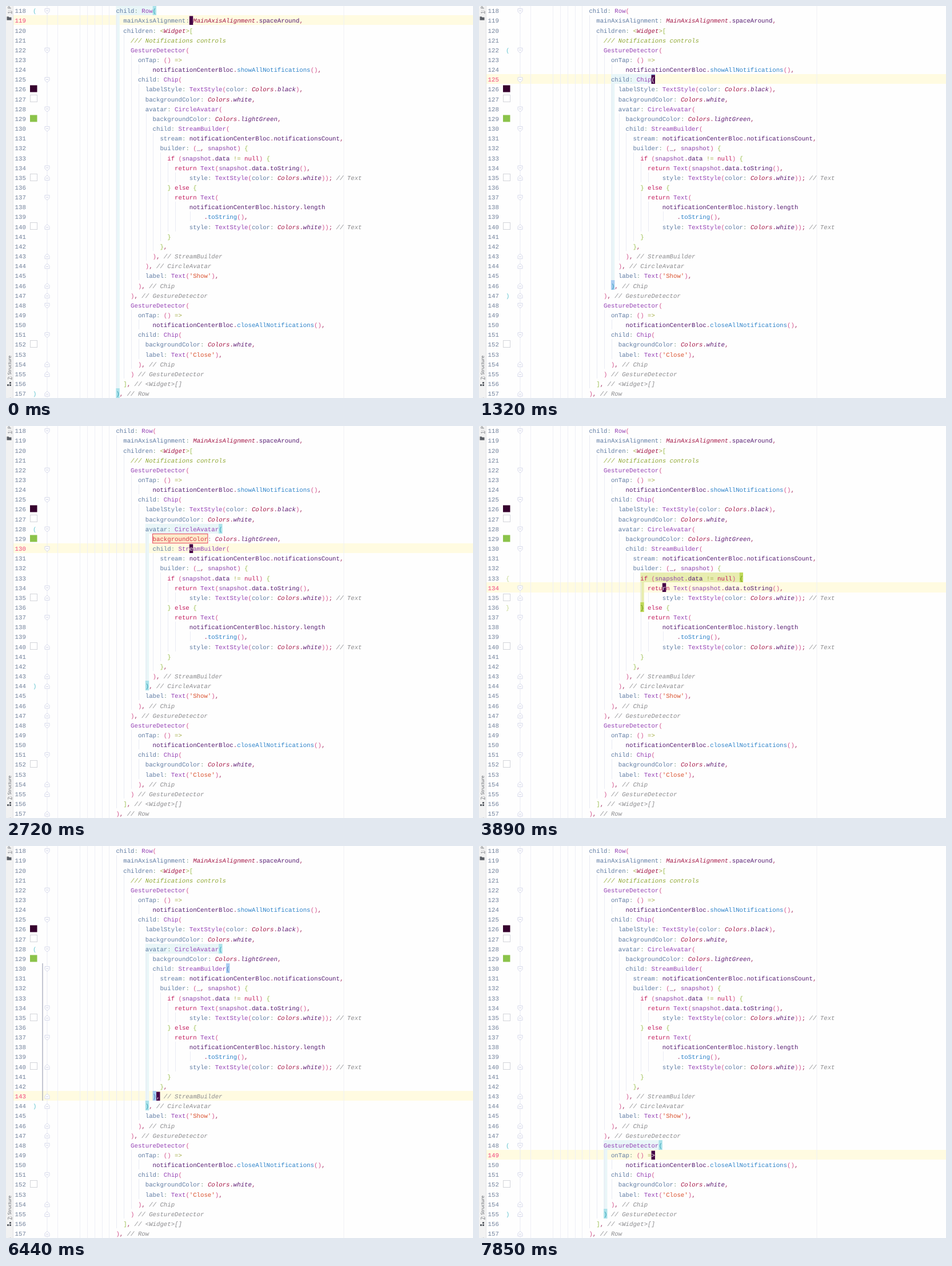
Animation of 817x685 px, one loop 8 s. Source, as an HTML page:

```html
<!DOCTYPE html>
<html lang="en">
<head>
<meta charset="utf-8">
<title>Code editor</title>
<style>
  html, body { margin: 0; width: 100%; height: 100%; overflow: hidden; background: #fefefe; }
  svg { display: block; width: 817px; height: 685px; }
  text { font: 10.7px "Liberation Mono", "DejaVu Sans Mono", monospace; white-space: pre; text-rendering: geometricPrecision; }
  .i { font-style: italic; }
  .side { font: 7.8px "Open Sans", "Noto Sans", sans-serif; fill: #55585f; }
</style>
</head>
<body>
<svg id="stage" viewBox="0 0 817 685" xmlns="http://www.w3.org/2000/svg">
  <rect width="817" height="685" fill="#fefefe"/>
  <g id="back"></g>
  <g id="fixed"></g>
  <g id="front"></g>
  <g id="side">
    <rect width="12.5" height="685" fill="#f2f2f2"/>
    <path d="M12.5 0V685" stroke="#e3e3e6"/>
    <text class="side" transform="translate(8.6 13.5) rotate(-90)"><tspan text-decoration="underline">1</tspan>: Project</text>
    <path d="M1.5 18.5h3l1 1.2h4v5h-8z" fill="#5b5f66"/>
    <text class="side" transform="translate(8.6 653) rotate(-90)"><tspan text-decoration="underline">7</tspan>: Structure</text>
    <path d="M6 657h3v3h-3zM2 661h3v3h-3zM6 661h3v3h-3z" fill="#5b5f66"/>
    <text class="side" transform="translate(8.6 688) rotate(-90)">s</text>
  </g>
</svg>
<script>
const FIRST = 118, ROW = 17.154, CW = 6.42, X0 = 192.4, LOOP = 8000;

const code = `child: Row(
  mainAxisAlignment: MainAxisAlignment.spaceAround,
  children: <Widget>[
    /// Notifications controls
    GestureDetector(
      onTap: () =>
          notificationCenterBloc.showAllNotifications(),
      child: Chip(
        labelStyle: TextStyle(color: Colors.black),
        backgroundColor: Colors.white,
        avatar: CircleAvatar(
          backgroundColor: Colors.lightGreen,
          child: StreamBuilder(
            stream: notificationCenterBloc.notificationsCount,
            builder: (_, snapshot) {
              if (snapshot.data != null) {
                return Text(snapshot.data.toString(),
                    style: TextStyle(color: Colors.white)); // Text
              } else {
                return Text(
                    notificationCenterBloc.history.length
                        .toString(),
                    style: TextStyle(color: Colors.white)); // Text
              }
            },
          ), // StreamBuilder
        ), // CircleAvatar
        label: Text('Show'),
      ), // Chip
    ), // GestureDetector
    GestureDetector(
      onTap: () =>
          notificationCenterBloc.closeAllNotifications(),
      child: Chip(
        backgroundColor: Colors.white,
        label: Text('Close'),
      ), // Chip
    ) // GestureDetector
  ], // <Widget>[]
), // Row`.split("\n");

// Token rules, first match wins: pattern, colour, italic
const rules = [
  [/\/\/\/.*/y, "#8fa832", 1],
  [/\/\/.*/y, "#8a8a8d", 1],
  [/'[^']*'/y, "#d9502c"],
  [/(return|if|else|null)\b/y, "#c2185b"],
  [/(Colors|MainAxisAlignment|Widget)\b/y, "#a31545", 1],
  [/(?<=Colors\.)\w+/y, "#5c1a72", 1],
  [/\w+(?=:)/y, "#5f7ba3"],
  [/[A-Z]\w*/y, "#9440b4"],
  [/(?<!data\.)\b\w+(?=\(\))/y, "#2c82c9"],
  [/snapshot\b/y, "#8a3ea8"],
  [/\w+/y, "#541a70"],
  [/[{}\[\]]/y, "#9dc04f"],
  [/=>|!=|[<>]/y, "#a3ad45"],
  [/:/y, "#7d9f86"],
  [/[()]/y, "#d4518c"],
  [/[.,;]/y, "#a3285c"],
  [/\s+/y, "none"]
];

const $ = id => document.getElementById(id);
const colX = c => X0 + c * CW;
const rowY = n => Math.round((n - FIRST) * ROW - 1);
const baseY = n => (n - FIRST) * ROW + 12.2;
const line = n => code[n - FIRST];
const bare = n => line(n).replace(/ *\/\/ .*/, "");
const indent = n => line(n).search(/\S/);
const esc = s => s.replace(/&/g, "&amp;").replace(/</g, "&lt;");
const rect = (x, y, w, h, fill, more = "") =>
  `<rect x="${x}" y="${y}" width="${w}" height="${h}" fill="${fill}" ${more}/>`;
// Fills the rows a to b between two columns
const block = (a, b, from, to, fill) =>
  b >= a && to > from ? rect(colX(from), rowY(a), (to - from) * CW, rowY(b + 1) - rowY(a), fill) : "";
const text = (x, n, s, fill, italic) =>
  `<text x="${x}" y="${baseY(n)}" fill="${fill}"${italic ? ' class="i"' : ""}>${esc(s)}</text>`;
const stroke = (d, color, w = 1) =>
  `<path d="${d}" fill="none" stroke="${color}" stroke-width="${w}"/>`;

function paintLine(n) {
  const s = line(n);
  let out = "", at = 0;
  while (at < s.length) {
    for (const [re, fill, italic] of rules) {
      re.lastIndex = at;
      const m = re.exec(s);
      if (!m) continue;
      if (fill !== "none") out += text(colX(at), n, m[0], fill, italic);
      at += m[0].length;
      break;
    }
  }
  return out;
}

const guide = (c, y1, y2, color) => stroke(`M${Math.ceil(colX(c) + .3) + .5} ${y1}V${y2}`, color);

function guides() {
  let out = "";
  for (const c of [-16, -10, -8, -6, -4, -2]) out += guide(c, 0, 685, "#eeeff6");
  code.forEach((s, k) => {
    const n = FIRST + k;
    let end = n + 1;
    while (line(end) && indent(end) > indent(n)) end++;
    if (end > n + 1) out += guide(indent(n), rowY(n + 1), rowY(end), "#e9ebf4");
  });
  return out + stroke("M591 0V685", "#eff0f5");
}

function fold(n, up) {
  const y = baseY(n) - 3.4, d = up ? -1 : 1;
  return `<path d="M68 ${y - 4 * d}h8v${5 * d}l-4 ${3.5 * d}l-4 ${-3.5 * d}z" fill="#fff" stroke="#d5d8ea"/>`
    + stroke(`M70 ${y - .5 * d}h4`, "#c9cde2");
}

const filled = (n, color) => rect(42, rowY(n) + 2.5, 12.5, 12, color);
const hollow = n => rect(42.5, rowY(n) + 2.5, 12, 12, "#fff", 'stroke="#d3d5da"');

function drawFixed() {
  let out = guides() + stroke("M72 0V685", "#e8eaf3");
  for (const n of [118, 122, 125, 128, 130, 134, 137, 148, 151]) out += fold(n);
  for (const n of [135, 140, 143, 144, 146, 147, 154, 155, 157]) out += fold(n, true);
  out += filled(126, "#36032e") + filled(129, "#8bc34a");
  for (const n of [127, 135, 140, 152]) out += hollow(n);
  code.forEach((_, k) => out += paintLine(FIRST + k));
  $("fixed").innerHTML = out;
}

// Start time and caret line
const steps = [
  [0, 119], [230, 120], [460, 121], [690, 122], [920, 123], [1150, 124],
  [1320, 125], [1390, 125], [1550, 126], [1780, 127], [2020, 128], [2340, 129],
  [2720, 130], [2950, 131], [3340, 132], [3570, 133], [3890, 134], [4270, 135],
  [4590, 136], [4900, 137], [5140, 138], [5440, 139], [5590, 140], [5910, 141],
  [6140, 142], [6440, 143], [6680, 144], [6910, 145], [7150, 146], [7390, 147],
  [7620, 148], [7850, 149]
];

// Scope name: first line, last line, bracket pair
const scopes = {
  row: [118, 157, "()"], list: [120, 156, "[]"], show: [122, 147, "()"], chip: [125, 146, "()"],
  avatar: [128, 144, "()"], stream: [130, 143, "()"], build: [132, 142, "{}"], test: [133, 133, "()"],
  yes: [133, 136, "{}"], yesText: [134, 135, "()"], no: [136, 141, "{}"], noText: [137, 140, "()"],
  label: [145, 145, "()"], close: [148, 155, "()"]
};

// Enclosing scope for caret lines 119 to 149
const scopeOf = ("row list list show show show chip chip chip chip avatar avatar stream stream test yes yesText " +
  "build no noText noText noText no stream avatar chip label show list close close").split(" ");

// Scopes whose closing bracket sits just before the caret
const matchOf = { 142: "build", 143: "stream", 144: "avatar", 146: "chip", 147: "show" };

// Area, bracket cell, bracket ink, gutter ink
const tones = {
  "(": ["#e9f6f8", "#abe2ea", "#2f9fb4", "#62c3cf"],
  "[": ["#f1f5d6", "#d5e48a", "#8aa62c", "#cfdc9c"],
  "{": ["#e8edb0", "#bfd959", "#6f9420", "#c6d892"]
};
const BLUE = "#a9cdf2";

const ends = ([a, b, pair]) => [line(a).indexOf(pair[0]), bare(b).lastIndexOf(pair[1])];
const cell = (n, c, fill, ink) => block(n, n, c, c + 1, fill) + text(colX(c), n, line(n)[c], ink);

function scopeArea(scope) {
  const [a, b, pair] = scope, [c1, c2] = ends(scope), fill = tones[pair[0]][0];
  if (a === b) return block(a, a, c1, c2, fill);
  let left = 99;
  for (let n = a + 1; n <= b; n++) left = Math.min(left, indent(n));
  return block(a, a, left, c1, fill) + block(a + 1, b - 1, left, left + 1, fill) + block(b, b, left, c2, fill);
}

function brackets(scope, fill, ink) {
  const [c1, c2] = ends(scope);
  return cell(scope[0], c1, fill, ink) + cell(scope[1], c2, fill, ink);
}

function gutter([a, b, pair]) {
  if (a === b) return "";
  const ink = tones[pair[0]][3];
  const x = n => n === 135 || n === 140 ? 38 : 47;
  return text(x(a), a, pair[0], ink) + text(x(b), b, pair[1], ink);
}

function boxed(n) {
  const c = indent(n);
  return rect(colX(c), rowY(n) + .5, 15 * CW, ROW - 1, "#fdeacb", 'stroke="#e8455a"')
    + text(colX(c), n, "backgroundColor", "#d93a4a");
}

function drawStep(k) {
  const [time, n] = steps[k];
  const scope = scopes[scopeOf[n - 119]];
  const [c1, c2] = ends(scope), [, mark, ink] = tones[scope[2][0]];
  const col = Math.min(20, bare(n).length - 1);

  $("back").innerHTML = rect(13, rowY(n), 804, rowY(n + 1) - rowY(n), "#fffbe1") + scopeArea(scope);

  let out = "";
  code.forEach((_, i) => {
    const num = FIRST + i;
    out += text(15.6, num, String(num), num === n ? "#f0457c" : "#71819b");
  });
  // The gutter marks trail the caret once
  out += gutter(time === 1320 ? scopes.show : scope);

  const onBracket = n === scope[0] && col === c1 || n === scope[1] && col === c2;
  out += brackets(scope, onBracket && scope[2] === "()" ? BLUE : mark, ink);

  const match = scopes[matchOf[n]];
  if (match) {
    out += brackets(match, BLUE, "#4f86b8");
    out += stroke(`M64 ${rowY(match[0])}V${rowY(match[1] + 1)}`, "#8a8fa8");
  }
  if (n === 127 || n === 128) out += boxed(127) + boxed(152);
  if (n === 129 || n === 130) out += boxed(129);

  out += rect(colX(col), rowY(n) + 1.5, CW, 15.5, "#460046") + text(colX(col), n, line(n)[col], "#fff");
  $("front").innerHTML = out;
}

let shown = -1;
function tick() {
  const t = performance.now() % LOOP;
  let k = steps.length - 1;
  while (steps[k][0] > t) k--;
  if (k !== shown) drawStep(shown = k);
  requestAnimationFrame(tick);
}

drawFixed();
tick();
</script>
</body>
</html>
```
